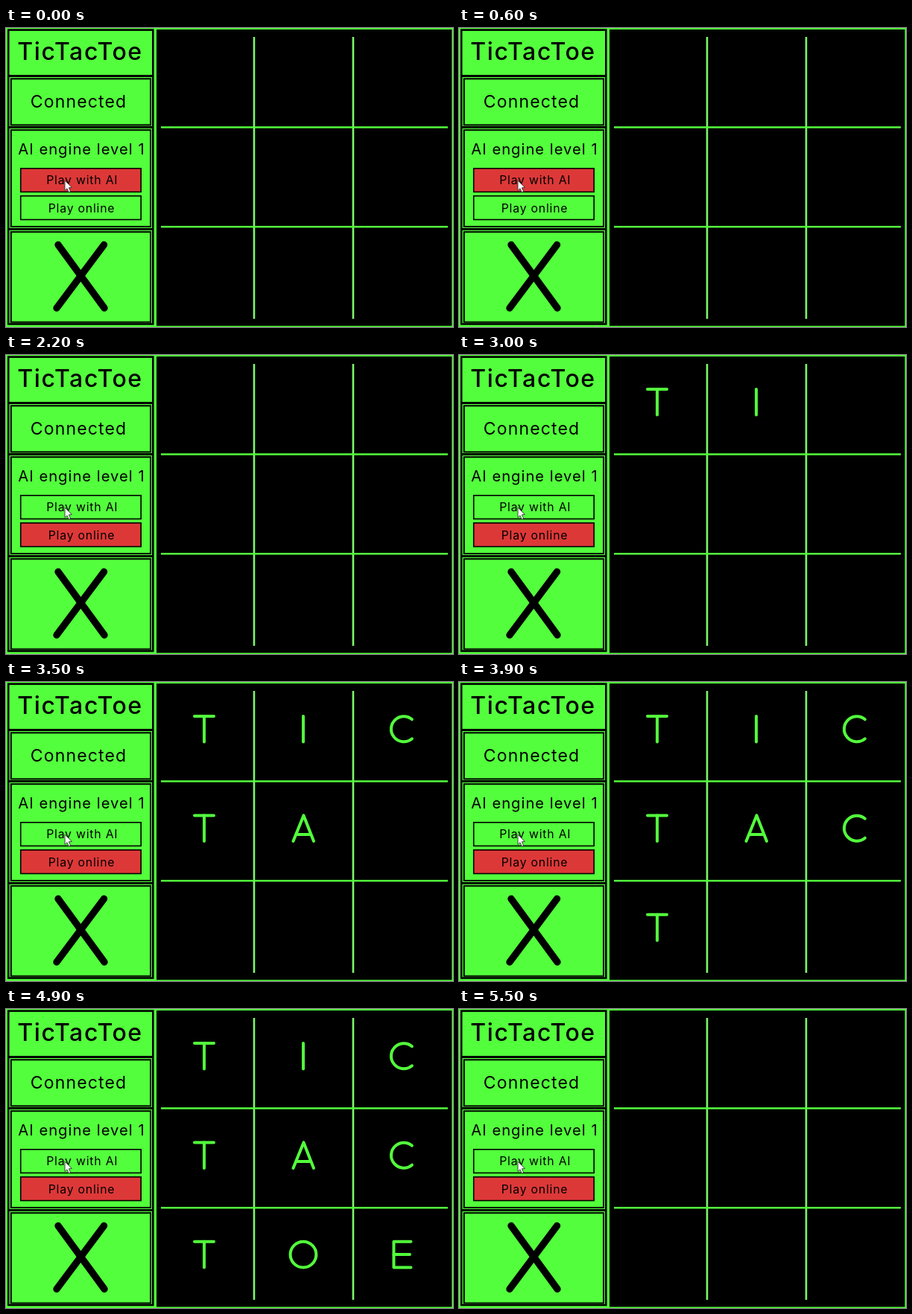
These frames come from a looping animation (600 by 402 pixels, 5.7 s). An HTML page with a canvas:

```html
<!DOCTYPE html>
<html lang="en">
<head>
<meta charset="utf-8">
<title>TicTacToe</title>
<style>
  html, body { margin: 0; width: 100%; height: 100%; overflow: hidden; background: #000; }
  canvas { display: block; width: 600px; height: 402px; }
</style>
</head>
<body>
<canvas id="stage" width="600" height="402"></canvas>
<script>
const ctx = document.getElementById('stage').getContext('2d');
const GREEN = '#53ff3c', PALE = '#7cf76a', RED = '#dd3838', BLACK = '#000';
const LOOP = 5700, SWITCH = 2200, FIRST = 2700, STEP = 200, CLEAR = 5400;
const WORD = 'TICTACTOE';

// Paths are centred on 0,0
const glyphs = {
  T() { line(-13, -17.3, 13, -17.3); line(0, -17.3, 0, 17.3); },
  I() { line(0, -17.3, 0, 17.3); },
  C() { arc(2, 0, 17, 0.87, Math.PI * 2 - 0.87); },
  A() { line(-13.5, 17.3, 0.5, -17.3, 14, 17.3); line(-9, 8.3, 10, 8.3); },
  O() { arc(0, 0, 17.4, 0, Math.PI * 2); },
  E() { line(11.5, -17.3, -11.5, -17.3, -11.5, 17.3, 11.5, 17.3); line(-11.5, 0, 10, 0); }
};

function line(...pts) {
  ctx.beginPath();
  for (let i = 0; i < pts.length; i += 2) ctx.lineTo(pts[i], pts[i + 1]);
  ctx.stroke();
}

function arc(x, y, r, from, to) {
  ctx.beginPath();
  ctx.arc(x, y, r, from, to);
  ctx.stroke();
}

function pen(color, width, cap = 'butt') {
  ctx.strokeStyle = color;
  ctx.lineWidth = width;
  ctx.lineCap = cap;
  ctx.lineJoin = cap === 'round' ? 'round' : 'miter';
}

function box(x1, y1, x2, y2, fill) {
  if (fill) {
    ctx.fillStyle = fill;
    ctx.fillRect(x1, y1, x2 - x1, y2 - y1);
  }
  ctx.strokeRect(x1, y1, x2 - x1, y2 - y1);
}

function label(text, x, y, size, weight = 400) {
  ctx.font = `${weight} ${size}px Inter, "Open Sans", sans-serif`;
  ctx.letterSpacing = `${size * 0.05}px`;
  ctx.textAlign = 'center';
  ctx.fillStyle = BLACK;
  ctx.fillText(text, x, y);
}

function drawSidebar(online) {
  pen(BLACK, 2.6);
  box(3.2, 2.6, 197.3, 398);
  pen(BLACK, 3);
  for (const y of [64.5, 133.5, 270.5]) line(3, y, 198, y);
  pen(BLACK, 2);
  box(6.8, 68.3, 194, 130.4);
  box(6.8, 137.2, 194, 267);
  box(6.8, 274.2, 194, 395.5);

  label('TicTacToe', 99.5, 43, 32, 500);
  label('Connected', 97.5, 107, 23);
  label('AI engine level 1', 101.5, 170, 20.2);

  pen(BLACK, 1.6);
  box(19.7, 188.8, 181.2, 220.4, online ? GREEN : RED);
  box(19.7, 225.8, 181.2, 257.6, online ? RED : GREEN);
  label('Play with AI', 102.3, 210, 15.8);
  label('Play online', 101.5, 248, 15.8);

  pen(BLACK, 9.4, 'round');
  line(70, 291.5, 132, 376.5);
  line(131.5, 291.5, 68, 376.5);
}

function drawBoard(count) {
  ctx.fillStyle = BLACK;
  ctx.fillRect(202, 2, 396.5, 398.5);
  pen(PALE, 2.6);
  for (const x of [333, 466]) line(x, 12, x, 391);
  pen(GREEN, 2.6);
  for (const y of [133.5, 267.3]) line(208, y, 593, y);

  pen(GREEN, 4, 'round');
  for (let i = 0; i < count; i++) {
    ctx.save();
    ctx.translate(266 + (i % 3) * 133, 63.3 + Math.floor(i / 3) * 133.4);
    glyphs[WORD[i]]();
    ctx.restore();
  }
}

function drawCursor(x, y) {
  const shape = [0, 0, 0, 13.5, 3, 10.8, 5.2, 15.8, 7.6, 14.8, 5.4, 9.8, 9.4, 9.5];
  ctx.beginPath();
  for (let i = 0; i < shape.length; i += 2) ctx.lineTo(x + shape[i], y + shape[i + 1]);
  ctx.closePath();
  ctx.fillStyle = '#fff';
  ctx.fill();
  pen('#333', 0.9);
  ctx.stroke();
}

function draw(t) {
  const shown = Math.floor((t - FIRST) / STEP) + 1;
  const count = t >= CLEAR ? 0 : Math.max(0, Math.min(WORD.length, shown));
  ctx.fillStyle = GREEN;
  ctx.fillRect(0, 0, 600, 402);
  drawSidebar(t >= SWITCH);
  drawBoard(count);
  drawCursor(79, 205);
}

const start = performance.now();
function tick() {
  draw((performance.now() - start) % LOOP);
  requestAnimationFrame(tick);
}
tick();
</script>
</body>
</html>
```
